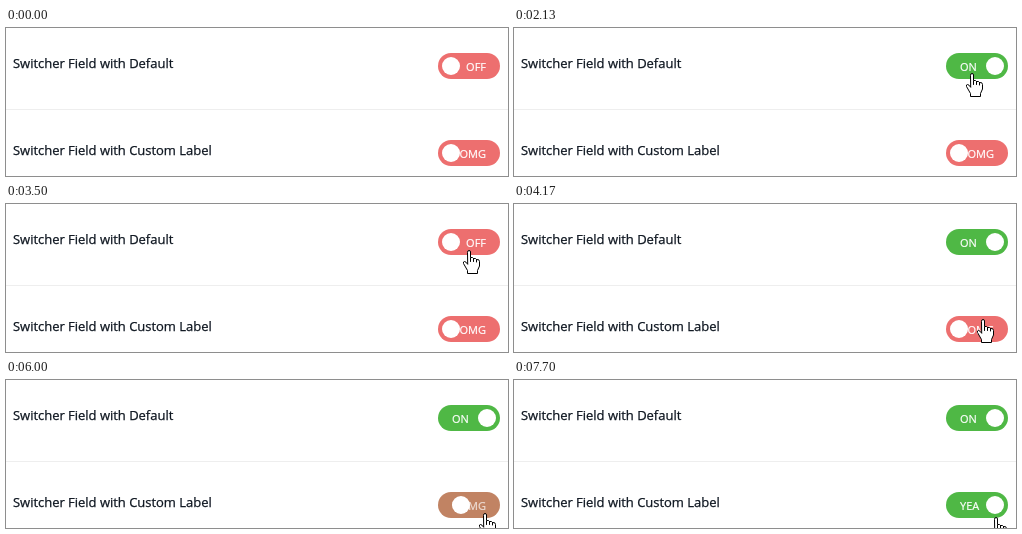
Animation of 502x148 px, one loop 8000 ms. Source, as an HTML page:

```html
<!DOCTYPE html>
<html lang="en">
<head>
<meta charset="utf-8">
<title>Switcher fields</title>
<style>
  html, body { margin: 0; width: 100%; height: 100%; overflow: hidden; background: #fff; }
  svg { display: block; font-family: "Open Sans", "Noto Sans", sans-serif; }
  .title { font-size: 13px; letter-spacing: -.02px; fill: #0e1620; stroke: #0e1620; stroke-width: .25px; }
  .label { font-size: 11px; fill: #fff; stroke: #fff; stroke-width: .2px; }
  .cursor { fill: #fff; stroke: #000; stroke-linejoin: round; stroke-linecap: round; }
</style>
</head>
<body>
<svg width="502" height="148" viewBox="0 0 502 148">
  <rect y="81" width="502" height="1" fill="#eee"/>
  <g id="rows"></g>
  <g id="cursor" class="cursor">
    <g id="hand">
      <path d="M-1.5 2Q-1.5 .5 0 .5T1.5 2V7.5Q4 7 4.5 8.5Q7 8 7.5 9.5Q10.5 9 10.5 11.5V16L8.5 20.5V23.5H-1.5V20.5L-5.5 13.5Q-6 11.5-4.5 11.5T-1.5 14Z"/>
      <path d="M1.5 8V11.5M4.5 8.5V11.5M7.5 9.5V12" fill="none"/>
    </g>
    <path id="arrow" d="M.5 .5V16.5L4 13L6.5 18.5L9 17.5L6.5 12H11.5Z"/>
  </g>
</svg>
<script>
const LOOP = 8000, FADE = 185, ENTER = 1130;
const RED = [237, 111, 111], GREEN = [79, 184, 69];
const $ = id => document.getElementById(id);

// Clicks alternate between on and off.
const switches = [
  { y: 25, title: "Switcher Field with Default", on: "ON", off: "OFF", clicks: [1590, 2790, 3715] },
  { y: 112, title: "Switcher Field with Custom Label", on: "YEA", off: "OMG", clicks: [4620, 5880, 7120] }
];

// Pointer moves, each from wherever the last one ended
const home = { x: 487, y: 36 };
const moves = [
  { at: ENTER, time: 140, x: 468, y: 36 },
  { at: 1640, time: 190, x: 461, y: 67 },
  { at: 1940, time: 190, x: 458, y: 45 },
  { at: 3300, time: 200, x: 463, y: 46 },
  { at: 3880, time: 350, x: 469, y: 121 },
  { at: 4610, time: 190, x: 479, y: 133 },
  { at: 7570, time: 130, x: 482, y: 137 }
];

const mix = (a, b, k) => a + (b - a) * k;
const smooth = k => k * k * (3 - 2 * k);
const progress = (t, start, time) => smooth(Math.min(1, Math.max(0, (t - start) / time)));

for (const s of switches) {
  const row = document.createElementNS("http://www.w3.org/2000/svg", "g");
  row.setAttribute("transform", `translate(0 ${s.y})`);
  row.innerHTML = `
    <text class="title" x="7" y="15">${s.title}</text>
    <rect x="432" width="62" height="26" rx="13"/>
    <text class="label" x="446" y="18">${s.on}</text>
    <text class="label" x="480" y="18" text-anchor="end">${s.off}</text>
    <circle cy="13" r="9" fill="#fff"/>`;
  $("rows").append(row);
  [, s.pill, s.onText, s.offText, s.ball] = row.children;
}

function drawSwitch(s, t) {
  const k = s.clicks.reduce((v, c, i) => mix(v, 1 - i % 2, progress(t, c, FADE)), 0);
  s.pill.setAttribute("fill", `rgb(${RED.map((c, i) => Math.round(mix(c, GREEN[i], k)))})`);
  s.onText.setAttribute("opacity", k);
  s.offText.setAttribute("opacity", 1 - k);
  s.ball.setAttribute("cx", mix(445, 481, k));
}

function drawCursor(t) {
  let { x, y } = home;
  for (const m of moves) {
    const k = progress(t, m.at, m.time);
    x = mix(x, m.x, k);
    y = mix(y, m.y, k);
  }
  const over = switches.some(s => y >= s.y && y < s.y + 26);
  $("cursor").style.display = t < ENTER ? "none" : "";
  $("cursor").setAttribute("transform", `translate(${Math.round(x)} ${Math.round(y)})`);
  $("hand").style.display = over ? "" : "none";
  $("arrow").style.display = over ? "none" : "";
}

const start = performance.now();
function frame() {
  const t = (performance.now() - start) % LOOP;
  switches.forEach(s => drawSwitch(s, t));
  drawCursor(t);
  requestAnimationFrame(frame);
}
frame();
</script>
</body>
</html>
```
